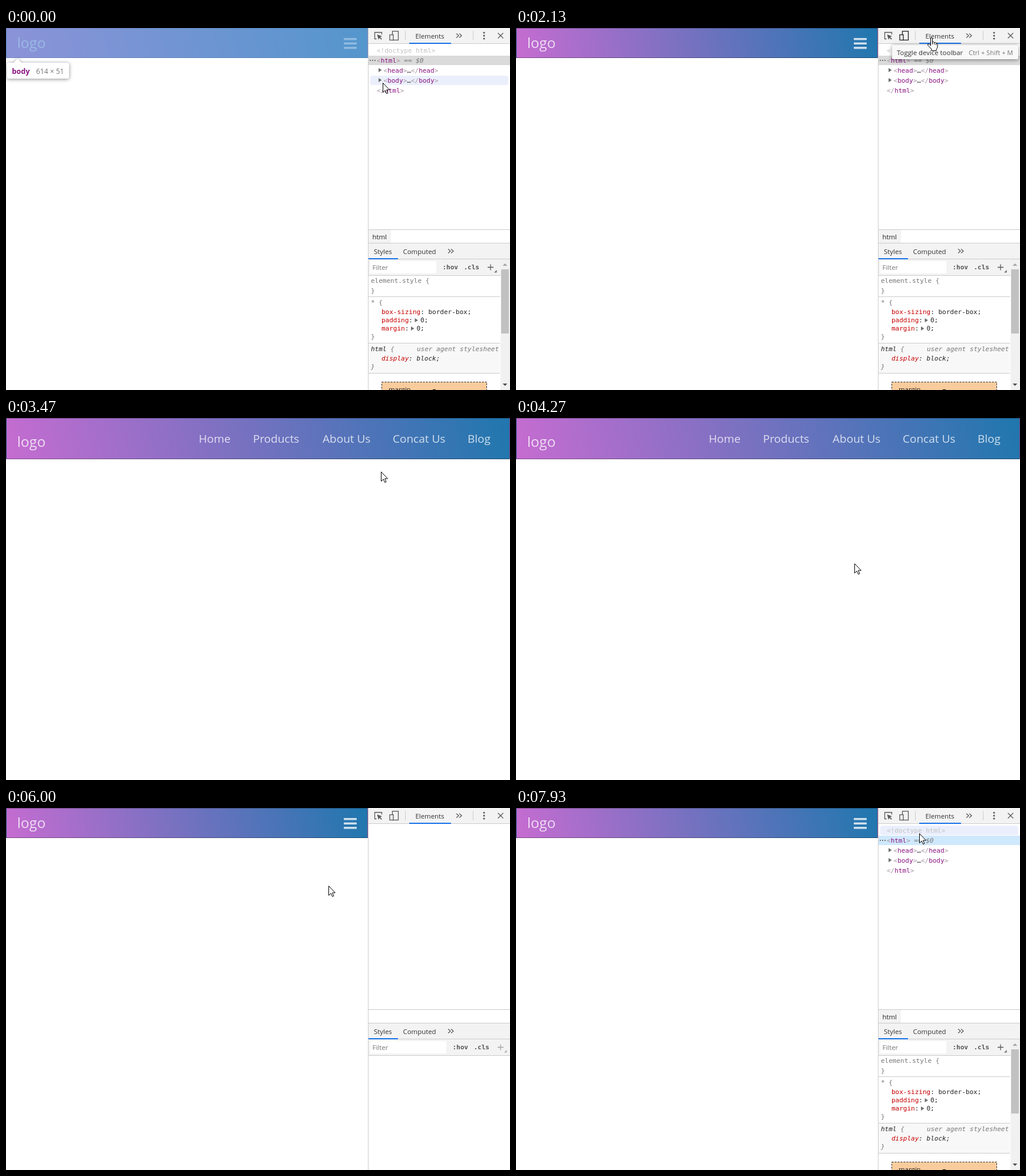
Recreate the animation shown at these times as an HTML page. Size 855x615 px, loop 8000 ms.

```html
<!DOCTYPE html>
<html lang="en">
<head>
<meta charset="utf-8">
<style>
  html, body { margin: 0; width: 100%; height: 100%; overflow: hidden; background: #fff; }
  #header, svg { position: absolute; left: 0; top: 0; }
  #header {
    box-sizing: border-box;
    border: 1px solid rgba(0, 0, 0, .35);
    background: linear-gradient(75deg, #c66cd1, #1f77ae);
  }
  text { font: 11.4px "Open Sans", sans-serif; fill: #333; white-space: pre; }
  .pale { fill: #fff; fill-opacity: .77; }
  .pale text { fill: inherit; }
  #logo text { font-size: 24px; }
  #nav text { font-size: 19px; }
  .mono text { font: 11px "DejaVu Sans Mono", monospace; fill: #222; }
  .mono .bracket { fill: #a894a6; }
  .mono .bold { font-weight: bold; fill: #555; }
  .mono .soft, .soft { fill: #777; }
  .mono .italic { font-style: italic; }
  .tag { fill: #881280; }
  .prop { fill: #c80000; }
  .bar { fill: #f3f3f3; }
  .rule { stroke: #ccc; fill: none; }
  .blue { fill: #1a73e8; }
  .icon { stroke: #5a5a5a; stroke-width: 1.3; fill: none; }
  .fill { fill: #6e6e6e; }
  #badge, #tip { filter: drop-shadow(0 1px 3px rgba(0, 0, 0, .45)); }
  #badge text { font-size: 12px; }
  #badge #node { font-weight: bold; font-size: 12.3px; }
</style>
</head>
<body>
<div id="header"></div>
<svg width="855" height="615" viewBox="0 0 855 615">
  <g class="pale">
    <g id="logo"><text x="19" y="34">logo</text></g>
    <g id="nav">
      <text x="327" y="42">Home</text>
      <text x="419" y="42">Products</text>
      <text x="537" y="42">About Us</text>
      <text x="656" y="42">Concat Us</text>
      <text x="783" y="42">Blog</text>
    </g>
    <g id="menu">
      <rect x="573" y="17" width="22" height="3.5" rx=".8"/>
      <rect x="573" y="24.5" width="22" height="3.5" rx=".8"/>
      <rect x="573" y="32" width="22" height="3.5" rx=".8"/>
    </g>
  </g>

  <g id="overlay">
    <rect width="614" height="51" fill="#6fa8dc" fill-opacity=".66"/>
    <g id="badge">
      <path d="M12 60L19.500 52L27 60Z" fill="#fff"/>
      <rect id="badgeBox" x="1.500" y="59" height="27" rx="3" fill="#fff"/>
      <text id="node" class="tag" x="10" y="78"></text>
      <text id="size" class="soft" y="78">614 × 51</text>
    </g>
  </g>

  <g id="panel">
    <path d="M614 0H855V615H614Z" fill="#fff"/>
    <path class="bar" d="M615 0H855V26H615ZM615 366H855V420H615Z"/>
    <path class="rule" d="M614.500 0V615M615 26.500H855M615 342.500H855M615 365.500H855M615 392.500H855M615 420.500H855M677.500 5V21M792.500 5V21"/>
    <path class="blue" d="M684 25H755V27H684ZM615 391H665V393H615Z"/>
    <path class="icon" d="M628.500 18.500H625.500V7.500H637.500V11M764 9.500L768 13L764 16.500M769 9.500L773 13L769 16.500M834.500 8.500L843.500 17.500M843.500 8.500L834.500 17.500M750 375.500L754 379L750 382.500M755 375.500L759 379L755 382.500"/>
    <path fill="#5a5a5a" d="M629.500 11L638 14L634.800 15.400L637.800 18.400L636.500 19.700L633.500 16.700L632 20Z"/>
    <g id="device" class="icon">
      <rect x="655.500" y="5.500" width="10" height="15"/>
      <rect class="bar" x="651" y="11.500" width="6" height="9"/>
    </g>
    <g fill="#5a5a5a"><circle cx="811" cy="8" r="1.6"/><circle cx="811" cy="13" r="1.6"/><circle cx="811" cy="18" r="1.6"/></g>
    <text x="694.500" y="18">Elements</text>
    <text x="624" y="384">Styles</text>
    <text x="673.500" y="384">Computed</text>
    <rect id="filter" x="618" y="396" height="21" fill="#fff"/>
    <text class="soft" x="621.500" y="411">Filter</text>
    <g id="tools" class="mono">
      <text class="bold" x="740.500" y="410">:hov</text>
      <text class="bold" x="776.500" y="410">.cls</text>
      <g id="add"><path class="icon" d="M817 406.500H827M822 401.500V411.500"/><path class="fill" d="M832.500 411V415.500H828Z"/></g>
    </g>

    <g id="content" class="mono">
      <rect id="hover" x="618" width="234" height="16" rx="4" fill="#ebeffc"/>
      <rect id="selected" x="615" y="47" width="240" height="16"/>
      <text x="629" y="42" style="fill:#c0c0c0">&lt;!doctype html&gt;</text>
      <path d="M617 54h2v2h-2zM621 54h2v2h-2zM625 54h2v2h-2z" fill="#777"/>
      <text class="bracket" x="629" y="59">&lt;<tspan class="tag">html</tspan>&gt;<tspan class="soft italic"> == $0</tspan></text>
      <path class="fill" d="M632 68L637.500 71.500L632 75ZM632 85L637.500 88.500L632 92Z"/>
      <text class="bracket" x="640.500" y="76">&lt;<tspan class="tag">head</tspan>&gt;<tspan fill="#222">…</tspan>&lt;/<tspan class="tag">head</tspan>&gt;</text>
      <text class="bracket" x="640.500" y="93">&lt;<tspan class="tag">body</tspan>&gt;<tspan fill="#222">…</tspan>&lt;/<tspan class="tag">body</tspan>&gt;</text>
      <text class="bracket" x="629" y="110">&lt;/<tspan class="tag">html</tspan>&gt;</text>

      <rect class="bar" x="615" y="343" width="38" height="22"/>
      <text x="621.500" y="359" style="font:11.4px 'Open Sans',sans-serif">html</text>

      <path d="M615 536H838V586H615Z" fill="#f8f8f8"/>
      <path class="rule" d="M615 456.500H838M615 535.500H838M615 586.500H838"/>
      <text class="soft" x="619" y="433">element.style {</text>
      <text class="soft" x="619" y="450">}</text>
      <text class="soft" x="619" y="470">* {</text>
      <text x="637" y="486"><tspan class="prop">box-sizing</tspan>: border-box;</text>
      <text x="637" y="500"><tspan class="prop">padding</tspan>:</text><text x="703" y="500">0;</text>
      <text x="637" y="514"><tspan class="prop">margin</tspan>:</text><text x="696.500" y="514">0;</text>
      <path class="fill" d="M693.500 493L699 496.500L693.500 500ZM687 507L692.500 510.500L687 514Z"/>
      <text class="soft" x="619" y="528">}</text>
      <text class="italic" x="619" y="549">html <tspan class="soft">{</tspan></text>
      <text class="soft italic" x="697" y="549">user agent stylesheet</text>
      <text class="italic" x="637" y="565"><tspan class="prop">display</tspan>: block;</text>
      <text class="soft italic" x="619" y="579">}</text>
      <rect x="637.500" y="601.500" width="178" height="40" fill="#f9cc9d" stroke="#222" stroke-dasharray="3 2"/>
      <text x="649" y="618" style="font:11.4px 'Open Sans',sans-serif">margin</text>
      <path d="M724 614h5v1h-5z"/>

      <path d="M839 393H855V615H839Z" fill="#f1f1f1"/>
      <path d="M840 410H853V519H840Z" fill="#c1c1c1"/>
      <path d="M842.500 404L846.500 400L850.500 404Z" fill="#a3a3a3"/>
      <path d="M842.500 604L846.500 608L850.500 604Z" fill="#505050"/>
    </g>

    <g id="tip">
      <rect x="638" y="29" width="214" height="24" rx="2" fill="#f8f8f8"/>
      <text x="646" y="46">Toggle device toolbar</text>
      <text class="soft" x="768" y="46" style="font-size:11px">Ctrl + Shift + M</text>
    </g>
  </g>

  <g id="cursor" fill="#fff" stroke="#000" stroke-linejoin="round">
    <path id="arrow" d="M.5 .5V16.500L4.200 13L6.700 18.500L9 17.500L6.600 12H11.500Z"/>
    <path id="hand" d="M-.5 14V2Q-.5 .5 1 .5T2.500 2V8Q4.500 6.500 5.500 8.700Q7.500 7.500 8.500 9.500Q11 9 11 11.500V16Q11 18.500 9 20V22.500H1V20L-5.500 13Q-6 10.500-3.500 11ZM2.500 8V12M5.500 9V12M8.500 10V13"/>
  </g>
</svg>
<script>
const LOOP = 8000;
const CLOSE = 3070, RELAYOUT = 5800, OPEN = 6000, INSPECT = 6270, LOADED = 6930;
const $ = id => document.getElementById(id);
const show = (id, on) => { $(id).style.display = on ? '' : 'none'; };
const set = (id, name, value) => $(id).setAttribute(name, value);
const ramp = (t, a, b) => Math.min(1, Math.max(0, (t - a) / (b - a)));

// Pointer stops: time, x, y
const stops = [
  [0, 639, 93], [130, 640, 97], [400, 650, 68], [800, 647, 16], [930, 652, 12],
  [1000, 652, 12], [1400, 594, 18], [1600, 598, 24], [1870, 655, 14], [2000, 659, 13],
  [2130, 704, 16], [2670, 832, 14], [2930, 831, 14], [3070, 831, 14], [3470, 636, 91],
  [3730, 503, 106], [3870, 503, 106], [4670, 645, 388], [4730, 652, 388], [4800, 652, 388],
  [5070, 579, 333], [5470, 547, 132], [6730, 547, 132], [7070, 628, 98], [7300, 660, 86],
  [7600, 652, 60], [7930, 684, 43], [8000, 684, 43]
];
const rowNodes = ['', 'html', '', 'body', 'html'];

function pointerAt(t) {
  const i = stops.findIndex(s => s[0] > t);
  const [t0, x0, y0] = stops[i - 1], [t1, x1, y1] = stops[i];
  const p = ramp(t, t0, t1), k = p * p * (3 - 2 * p);
  return [Math.round(x0 + (x1 - x0) * k), Math.round(y0 + (y1 - y0) * k)];
}

function render(t) {
  const [x, y] = pointerAt(t);
  const wide = t >= CLOSE && t < RELAYOUT;
  const open = t < CLOSE || t >= OPEN;
  const loaded = t < CLOSE || t >= LOADED;

  $('header').style.width = wide ? '855px' : '614px';
  $('header').style.height = wide ? '70px' : '51px';
  set('logo', 'transform', `translate(0 ${wide ? 15 : 0})`);
  show('nav', wide);
  show('menu', !wide);

  show('panel', open);
  show('content', loaded);
  set('filter', 'width', loaded ? 112 : 129);
  set('tools', 'transform', `translate(${loaded ? 0 : 17} 0)`);
  set('add', 'opacity', loaded ? 1 : .5);
  set('selected', 'fill', t < CLOSE ? '#dadada' : '#cfe8fc');

  const row = loaded && x >= 615 && y >= 30 && y < 115 ? Math.floor((y - 30) / 17) : -1;
  show('hover', row >= 0);
  set('hover', 'y', 30 + row * 17);

  const node = t >= INSPECT && !loaded ? 'html' : rowNodes[row];
  show('overlay', open && node);
  $('node').textContent = node || '';
  set('size', 'x', node === 'body' ? 51 : 48);
  set('badgeBox', 'width', node === 'body' ? 105.5 : 102.5);

  const tip = t < 1500 ? ramp(t, 670, 820) - ramp(t, 1200, 1340)
                       : ramp(t, 1860, 2000) - ramp(t, 2190, 2330);
  set('tip', 'opacity', tip);
  $('device').style.stroke = tip > 0 ? '#222' : '';

  const onTab = open && x >= 684 && x < 755 && y < 27;
  show('hand', onTab);
  show('arrow', !onTab);
  set('cursor', 'transform', `translate(${x} ${y})`);
}

function tick(now) {
  const step = Math.floor(now % LOOP * .015 + .06) % 120;
  render(Math.round(step * 20 / 3) * 10);
  requestAnimationFrame(tick);
}
tick(0);
</script>
</body>
</html>
```
